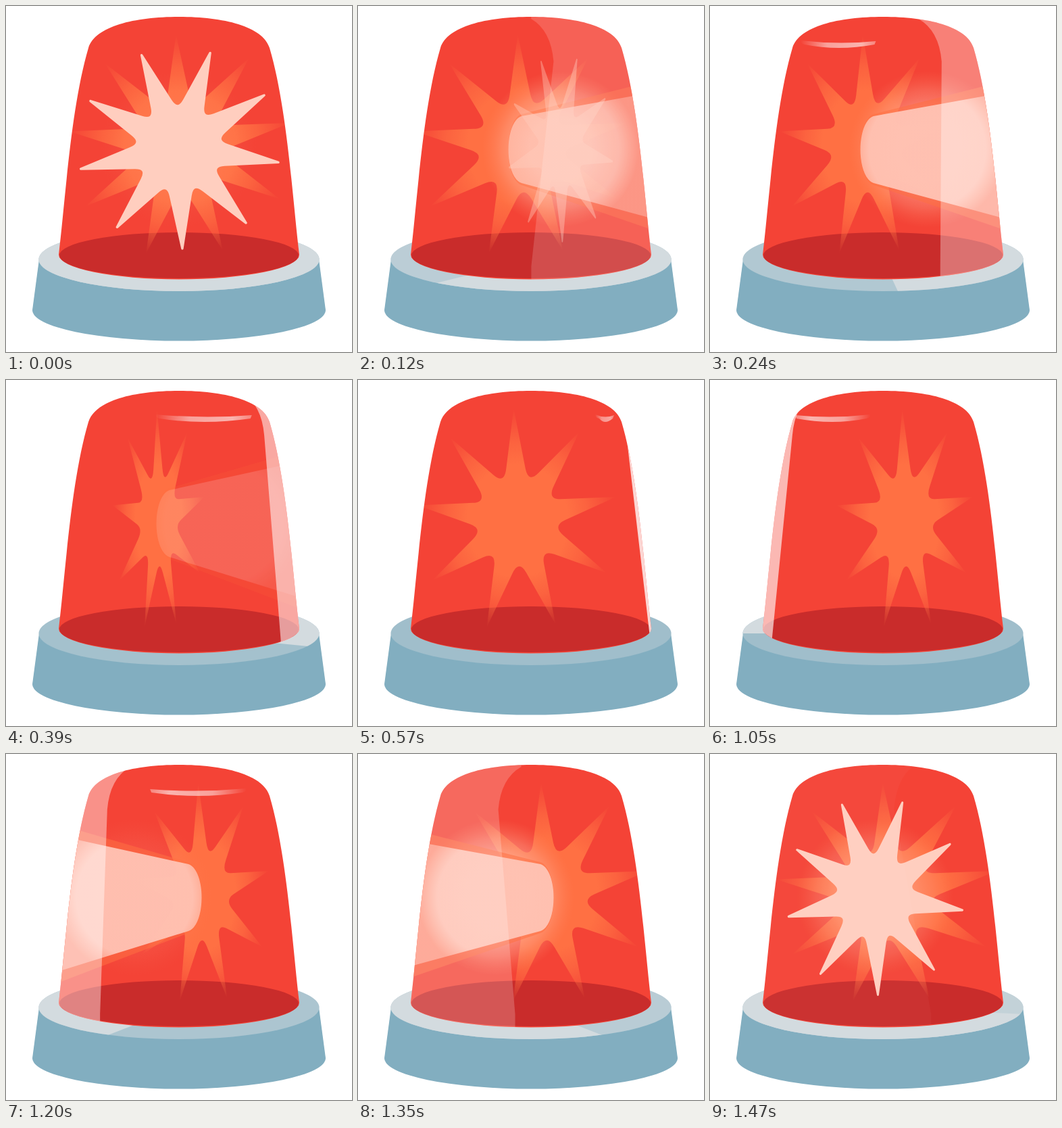
An HTML page that plays this animation: 512 px wide and 512 px high, repeating every 1.5 s.

```html
<!DOCTYPE html>
<html lang="en">
<head>
<meta charset="utf-8">
<title>Siren light</title>
<style>
html, body { margin: 0; width: 100%; height: 100%; overflow: hidden; background: #fff; }
svg { display: block; width: 100vw; height: 100vh; }
</style>
</head>
<body>
<svg viewBox="0 0 512 512">
  <defs>
    <path id="domeShape" d="M78 368C88 285 96 150 122 62C132 30 190 16 256 16C322 16 380 30 390 62C416 150 424 285 434 368A178 36.5 0 0 1 78 368Z"/>
    <clipPath id="dome"><use href="#domeShape"/></clipPath>
    <clipPath id="ring"><ellipse cx="256" cy="375" rx="207.5" ry="47"/></clipPath>
    <radialGradient id="ember" gradientUnits="userSpaceOnUse" cx="0" cy="0" r="166">
      <stop offset=".5" stop-color="#ff7043"/>
      <stop offset=".7" stop-color="#ff7043" stop-opacity=".7"/>
      <stop offset="1" stop-color="#ff7043" stop-opacity="0"/>
    </radialGradient>
    <radialGradient id="halo">
      <stop offset=".4" stop-color="#ffccbc" stop-opacity=".85"/>
      <stop offset=".75" stop-color="#ffab91" stop-opacity=".45"/>
      <stop offset="1" stop-color="#ff8a65" stop-opacity="0"/>
    </radialGradient>
    <radialGradient id="ray" gradientUnits="userSpaceOnUse" cy="212" r="115">
      <stop offset=".75" stop-color="#ffc6b8" stop-opacity=".92"/>
      <stop offset="1" stop-color="#ffc6b8" stop-opacity=".55"/>
    </radialGradient>
    <linearGradient id="gloss">
      <stop offset="0" stop-color="#fff" stop-opacity=".35"/>
      <stop offset=".2" stop-color="#fff" stop-opacity=".6"/>
      <stop offset=".65" stop-color="#fff" stop-opacity=".5"/>
      <stop offset="1" stop-color="#fff" stop-opacity="0"/>
    </linearGradient>
  </defs>
  <path fill="#82aec0" d="M49 375L39 450A217 45.5 0 0 0 473 450L463 375Z"/>
  <ellipse cx="256" cy="375" rx="207.5" ry="47" fill="#a0becb"/>
  <g clip-path="url(#ring)" fill="#d3dbdf">
    <rect id="wash" y="320" width="512" height="110"/>
    <path id="lit"/>
  </g>
  <use href="#domeShape" fill="#f44336"/>
  <ellipse cx="256" cy="369" rx="177" ry="34" fill="#c92c2b"/>
  <g clip-path="url(#dome)">
    <path id="back" fill="url(#ember)"/>
    <g id="front">
      <circle id="glow" cy="212" r="116" fill="url(#halo)"/>
      <g id="beam">
        <path id="fringe" fill="#ff7043" opacity=".55"/>
        <path id="core" fill="url(#ray)"/>
      </g>
      <path id="star" fill="#ffcebf" stroke="#ffcebf" stroke-width="3.4" stroke-linejoin="round"/>
      <path id="sheen" fill="#fff"/>
      <path id="shine" fill="url(#gloss)"/>
    </g>
  </g>
</svg>
<script>
const LOOP = 1500, STEP = 30, MID = 256;
const { PI, sin, cos, abs, min, max } = Math;
const $ = id => document.getElementById(id);
const set = (id, attrs) => { for (const k in attrs) $(id).setAttribute(k, attrs[k]); };
const ramp = (x, a, b) => max(0, min(1, (x - a) / (b - a)));
const mix = (a, b, p) => a + (b - a) * p;
const rad = deg => deg * PI / 180;

// Nine spikes with rounded valleys, centred on the origin.
function burst(outer, inner, start) {
  const pt = (r, deg) => [r * cos(rad(deg)), r * sin(rad(deg))];
  const near = (v, tip) => v.map((c, i) => mix(c, tip[i], .2));
  let d = '';
  for (let k = 0; k < 9; k++) {
    const deg = start + k * 40;
    const tip = pt(outer, deg), v = pt(inner, deg + 20), next = pt(outer, deg + 40);
    d += `${k ? 'L' : 'M'}${tip}L${near(v, tip)}Q${v} ${near(v, next)}`;
  }
  return d + 'Z';
}

// Part of the ring in the light, up to an edge that sweeps round the front.
function litSector(d) {
  const end = max(-70, 180 - .4 * d + 90 * (1 - ramp(d, 0, 20)));
  let path = `M${MID} 375`;
  for (let i = 0; i <= 24; i++) {
    const a = rad(mix(-70, end, i / 24));
    path += `L${MID - 400 * cos(a)} ${375 + 90 * sin(a)}`;
  }
  return path + 'Z';
}

// Beam from the lens towards the wall; spread is its half height at the wall.
function cone(reach, spread, pad) {
  const x = mix(240, 60, reach), p = (272 - x) / 212;
  const top = mix(163 - pad, 222 - spread, p), bottom = mix(262 + pad, 222 + spread, p);
  return `M${x} ${top}L270 ${163 - pad}C296 ${172 - pad} 296 ${253 + pad} 270 ${262 + pad}L${x} ${bottom}Z`;
}

// Reflection on the glass, bounded by a meridian at the given angle.
function panel(deg) {
  const edge = (r, k) => MID - r * cos(rad(deg * k));
  const foot = edge(178, 1), shoulder = edge(142, .85), crown = edge(110, 1);
  return `M0 0H${crown}V19Q${shoulder + 4} 36 ${shoulder} 82L${foot} 385V420H0Z`;
}

function crescent(phase) {
  const m = 252 + 105 * cos(phase), half = max(14, 75 * sin(phase));
  const l = m - half, r = m + half;
  return `M${l} 52Q${m} 57.5 ${r} 51Q${r + 1} 55 ${r - 6} 57Q${m} 67 ${l + 2} 57Z`;
}

function draw(t) {
  const turn = 2 * PI * t / LOOP;
  const flip = t < LOOP / 2;
  const d = min(t, LOOP - t);   // time away from facing the viewer
  const transform = flip ? 'translate(512 0) scale(-1 1)' : '';

  const width = 1 - .64 * (1 - abs(cos(turn))) ** 1.4;
  set('back', { transform: `translate(${258 - 32 * sin(turn)} 208) scale(${width} 1) rotate(-2.2)` });

  set('front', { transform });
  set('wash', { opacity: .75 * (1 - ramp(d, 0, 430)) });
  set('lit', { transform, d: litSector(d), opacity: 1 - ramp(d, 450, 560) });

  const cx = MID - 66 * sin(PI * min(d, 260) / 520);
  set('ray', { cx });
  set('glow', { cx, opacity: .85 * ramp(d, -10, 60) * (1 - ramp(d, 220, 320)) });
  set('star', {
    transform: `translate(${cx} 210.5) scale(${max(.2, 1 - .004 * d)} ${1 - min(d, 200) * .0006}) rotate(${flip ? 1.9 : -1.9})`,
    opacity: 1 - ramp(d, 70, 150)
  });

  const reach = ramp(d, 30, 110), spread = mix(97, 105, ramp(d, 240, 300));
  set('core', { d: cone(reach, spread, 0) });
  set('fringe', { d: cone(reach, spread + 18, 3) });
  set('beam', { opacity: ramp(d, 50, 140) * (1 - ramp(d, 310, 420)) });

  set('sheen', { d: panel(122 * (1 - ramp(d, 0, 690)) ** 1.6), opacity: .78 * ramp(d, 10, 560) });
  set('shine', {
    d: crescent(PI * ramp(d, 120, 570)),
    opacity: ramp(d, 170, 240) * (1 - ramp(d, 560, 630))
  });
}

set('back', { d: burst(166, 58, -90) });
set('star', { d: burst(148.5, 54, 90) });

const begin = performance.now();
function tick() {
  const t = (performance.now() - begin) % LOOP;
  draw(Math.floor(t / STEP) * STEP);
  requestAnimationFrame(tick);
}
draw(0);
requestAnimationFrame(tick);
</script>
</body>
</html>
```
